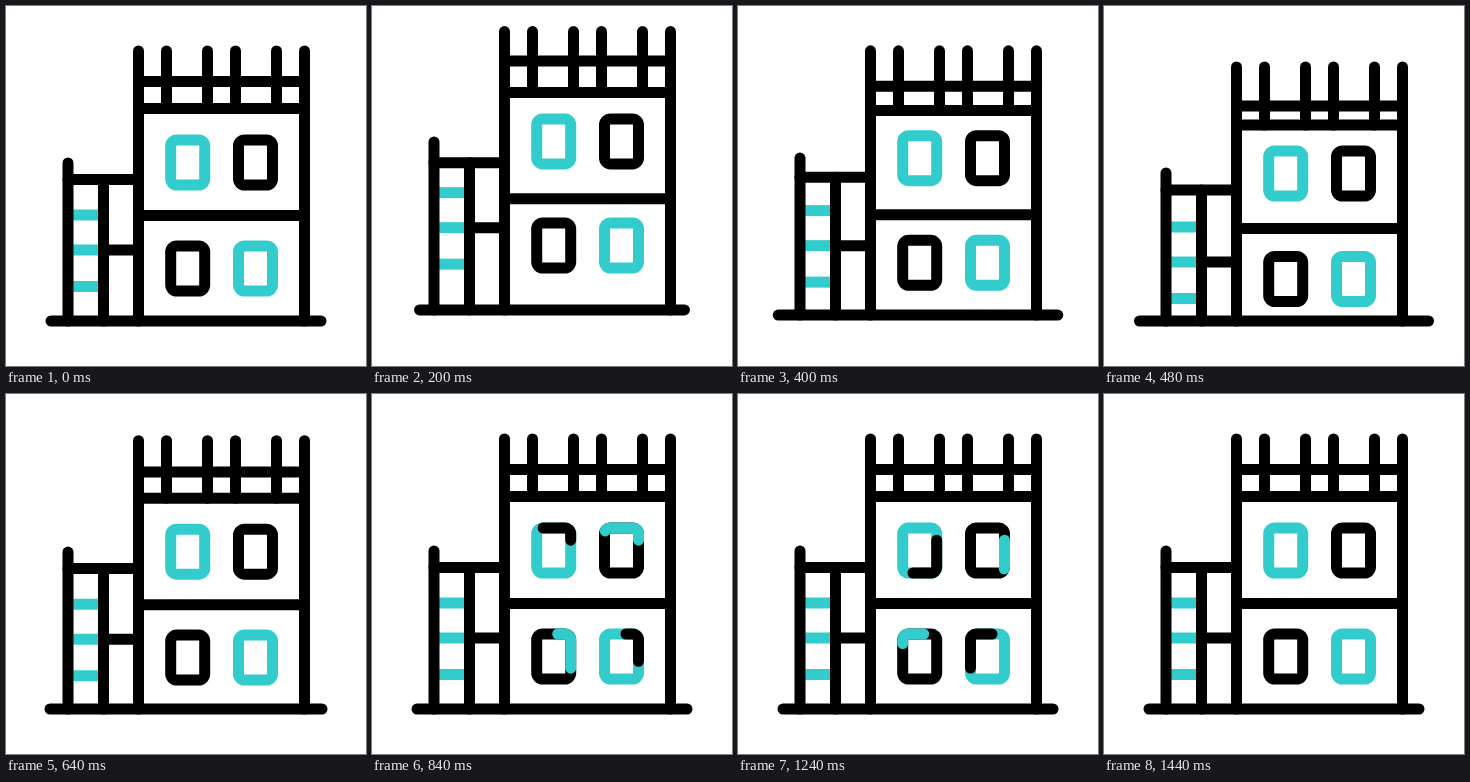
These frames come from a looping animation (360x360 px, 1480 ms). An HTML page with a canvas:

```html
<!DOCTYPE html>
<html lang="en">
<head>
<meta charset="utf-8">
<title>Building</title>
<style>
  html, body { margin: 0; width: 100%; height: 100%; overflow: hidden; background: #fff; }
  canvas { display: block; width: 360px; height: 360px; }
</style>
</head>
<body>
<canvas id="stage" width="360" height="360"></canvas>
<script>
const ctx = document.getElementById('stage').getContext('2d');
const LOOP = 1480, STEP = 40;
const BLACK = '#000', TEAL = '#33cccc';
const WIN = { w: 34, h: 45, r: 6 };
const PERIMETER = 2 * (WIN.w + WIN.h) - 8 * WIN.r + 2 * Math.PI * WIN.r;

// Heights at rest, at the top of the jump and in the squash.
const POSES = {
  postTop: [45, 15, 61],
  beam: [75.5, 44, 100],
  roof: [102.5, 78, 119],
  upperWindow: [134, 101.5, 145],
  floor: [209.5, 183.5, 222.5],
  lowerWindow: [240, 204.5, 250.5],
  ground: [315, 298, 315],
  annexRoof: [173.5, 147.5, 184],
  annexTop: [157, 124.5, 167],
  ladder: [244, 209.5, 256],
  groundHalf: [135, 131, 144.5]
};

function ease(t, from, to) {
  const x = Math.min(1, Math.max(0, (t - from) / (to - from)));
  return x * x * (3 - 2 * x);
}

function poseAt(t) {
  const up = ease(t, 80, 280), down = ease(t, 280, 480), settle = ease(t, 480, 680);
  const pose = {};
  for (const [name, [rest, peak, squash]] of Object.entries(POSES)) {
    pose[name] = rest + (peak - rest) * up + (squash - peak) * down + (rest - squash) * settle;
  }
  return pose;
}

function line(x1, y1, x2, y2, color = BLACK, cap = 'round') {
  ctx.strokeStyle = color;
  ctx.lineCap = cap;
  ctx.beginPath();
  ctx.moveTo(x1, y1);
  ctx.lineTo(x2, y2);
  ctx.stroke();
}

function frame(x, y, color) {
  ctx.strokeStyle = color;
  ctx.lineCap = 'round';
  ctx.beginPath();
  ctx.roundRect(x, y, WIN.w, WIN.h, WIN.r);
  ctx.stroke();
}

// A second colour runs once around the frame, then its tail follows.
function windowFrame(x, y, base, sweep, origin, direction, t) {
  frame(x, y, base);
  const quick = sweep === TEAL;
  const head = PERIMETER * ease(t, 680, quick ? 1120 : 1170);
  const tail = PERIMETER * (quick ? ease(t, 910, 1370) : ease(t, 950, 1440));
  const length = head - tail;
  if (length < 0.01) return;
  const start = direction > 0 ? origin + tail : origin - head;
  ctx.setLineDash([length, PERIMETER - length]);
  ctx.lineDashOffset = -start;
  frame(x, y, sweep);
  ctx.setLineDash([]);
}

function draw(t) {
  const p = poseAt(t);
  ctx.fillStyle = '#fff';
  ctx.fillRect(0, 0, 360, 360);
  ctx.lineWidth = 11;

  for (const offset of [-35, 0, 36.5]) {
    line(66, p.ladder + offset, 93, p.ladder + offset, TEAL, 'butt');
  }
  line(62, p.annexTop, 62, p.ground);
  line(62, p.annexRoof, 132.5, p.annexRoof);
  line(97.5, p.annexRoof, 97.5, p.ground);
  line(97.5, p.ladder, 132.5, p.ladder);

  for (const x of [132.5, 298.5]) line(x, p.postTop, x, p.ground);
  for (const x of [160.5, 201.5, 229.5, 270.5]) line(x, p.postTop, x, p.roof);
  for (const y of [p.beam, p.roof, p.floor]) line(132.5, y, 298.5, y);
  line(180 - p.groundHalf, p.ground, 180 + p.groundHalf, p.ground);

  windowFrame(164.7, p.upperWindow, TEAL, BLACK, 37.4, -1, t);
  windowFrame(232.5, p.upperWindow, BLACK, TEAL, 37.4, -1, t);
  windowFrame(164.7, p.lowerWindow, BLACK, TEAL, 15, 1, t);
  windowFrame(232.5, p.lowerWindow, TEAL, BLACK, 15.5, 1, t);
}

const startTime = performance.now();
function tick() {
  const t = (performance.now() - startTime) % LOOP;
  draw(Math.floor(t / STEP) * STEP);
  requestAnimationFrame(tick);
}
tick();
</script>
</body>
</html>
```
